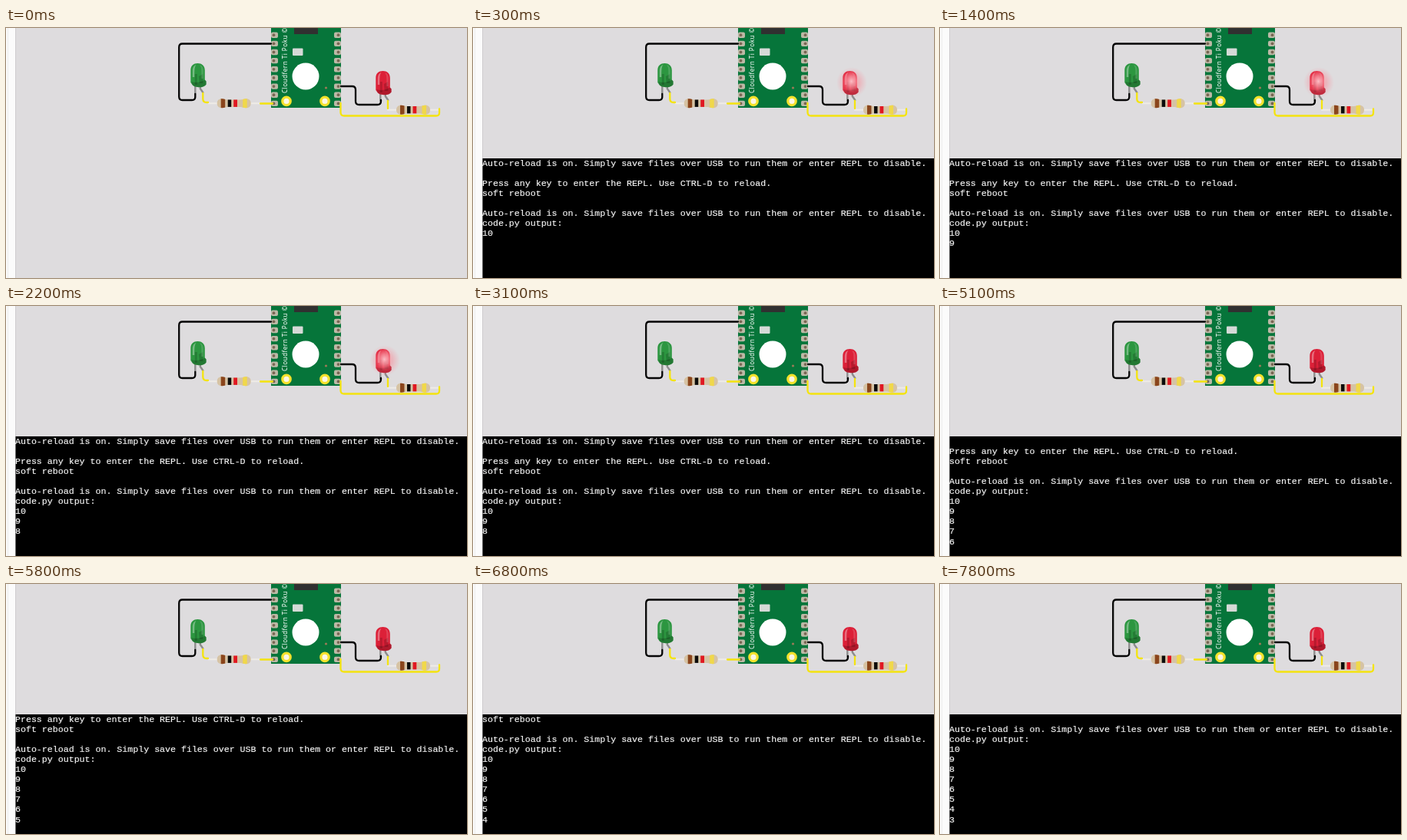
An HTML page that plays this animation: 600 px wide and 326 px high, repeating every 8 s.

```html
<!DOCTYPE html>
<html lang="en">
<head>
<meta charset="utf-8">
<title>Board countdown</title>
<style>
  html, body { margin: 0; width: 100%; height: 100%; overflow: hidden; background: #dedcde; }
  svg { display: block; width: 600px; height: 326px; }
  .wire { fill: none; stroke-width: 2.3; stroke-linecap: round; stroke-linejoin: round; }
  .black { stroke: #050505; }
  .yellow { stroke: #f4e40e; }
  .lead { stroke: #eeebe6; stroke-width: 2; }
  .leg { stroke: #8d8d8d; stroke-width: 2.4; }
  .label { font: 500 8.2px "Noto Sans", "Open Sans", sans-serif; letter-spacing: .44px; fill: #fff; }
  #term text {
    font: 11.61px "Liberation Mono", "Courier New", monospace; white-space: pre;
    fill: #f4f4f4; stroke: #f4f4f4; stroke-width: .2;
  }
</style>
</head>
<body>
<svg viewBox="0 0 600 326" xmlns="http://www.w3.org/2000/svg">
  <defs>
    <radialGradient id="halo">
      <stop offset="0" stop-color="#ff5a6c" stop-opacity=".65"/>
      <stop offset=".5" stop-color="#ff7080" stop-opacity=".36"/>
      <stop offset="1" stop-color="#ff8090" stop-opacity="0"/>
    </radialGradient>
    <radialGradient id="core">
      <stop offset="0" stop-color="#fff" stop-opacity=".65"/>
      <stop offset=".5" stop-color="#ffe0e4" stop-opacity=".36"/>
      <stop offset="1" stop-color="#ffb0b8" stop-opacity="0"/>
    </radialGradient>
    <g id="resistor">
      <path class="wire lead" d="M-11 0H56"/>
      <path fill="#d6c3a4" d="M6-6C10-6 11-4.7 14-4.7H30C33-4.7 34-6 38-6C42-6 44-3.5 44 0S42 6 38 6C34 6 33 4.7 30 4.7H14C11 4.7 10 6 6 6C2 6 0 3.5 0 0S2-6 6-6Z"/>
      <path fill="#8a451c" d="M5-5.9Q8-6.3 10.500-5.2V5.2Q8 6.3 5 5.9Z"/>
      <path fill="#0c0c0c" d="M14-4.700h4.500v9.400h-4.500z"/>
      <path fill="#e01822" d="M21.500-4.700h4.800v9.400h-4.800z"/>
      <path fill="#f0d84a" d="M33.500-5.200Q36-6.300 39-5.900V5.900Q36 6.300 33.500 5.200Z"/>
    </g>
    <g id="shape">
      <path class="wire leg" d="M6 30V39M12.500 30V33L16 38"/>
      <path d="M0 9C0 3 4 0 9.200 0S18.500 3 18.500 9V21.500L20.300 23.500V27.500C18 31 13 31.700 9 31C6 30.700 4 30 2.500 28.500L0 25Z"/>
      <path fill="#000" opacity=".2" d="M1 24Q9 27 18.500 21.500L20.300 23.500V27.500C18 31 13 31.700 9 31Q5 30.500 2.500 28.500Z"/>
      <path fill="#000" opacity=".17" d="M5.500 14H8.500V28H5.500ZM10.500 17L16 14V26H11.500Z"/>
      <path fill="#fff" opacity=".35" d="M2.500 10C2.500 6 4 3 7 2.300C5 5 5 9 5 18H2.500Z"/>
      <path fill="#fff" opacity=".15" d="M12 2Q17 4 16.500 11V20H14V10Q14 5 12 2Z"/>
    </g>
  </defs>

  <rect width="600" height="326" fill="#dedcde"/>
  <rect width="12" height="326" fill="#fbfbfb"/>
  <path d="M2.500 0V326" stroke="#ececec"/>
  <path d="M12.500 0V326" stroke="#cfcdcf"/>

  <g id="board">
    <rect x="345" y="-4" width="91" height="108" fill="#06753a"/>
    <g id="pads"></g>
    <rect x="375" y="-2" width="31" height="10" fill="#303030"/>
    <rect x="373" y="26.500" width="13.500" height="9.500" rx="1" fill="#d5dad7"/>
    <circle cx="390" cy="63" r="17.500" fill="#fff"/>
    <circle cx="416.500" cy="78" r="1.600" fill="#9a7a58"/>
    <g fill="#fbf6e4" stroke="#f4e22c" stroke-width="3.300">
      <circle cx="365" cy="95.400" r="5.200"/>
      <circle cx="415" cy="95.400" r="5.200"/>
    </g>
    <text class="label" transform="translate(366 85) rotate(-90)">Cloudfern Ti Poku ©</text>
  </g>

  <use href="#resistor" x="274.700" y="98.200"/>
  <use href="#resistor" x="508" y="106.700"/>
  <use href="#shape" x="240.300" y="46" fill="#2c9640"/>
  <use href="#shape" x="481.300" y="56" fill="#dc2038"/>

  <path class="wire black" d="M345 20.500H229.500Q225.200 20.500 225.200 25V89.500Q225.200 94 229.500 94H242Q246.300 94 246.300 90V86"/>
  <path class="wire black" d="M436 76H450.500Q455 76 455 80.500V95.500Q455 100 459.500 100H483.500Q488 100 488 95.500V94"/>
  <path class="wire yellow" d="M256.300 85V92.500Q256.300 97 261 97H263M331 98.500H347"/>
  <path class="wire yellow" d="M497 95V105M435.500 98V110Q435.500 114.500 440 114.500H560Q564 114.500 564 110.500V105.500"/>

  <g id="glow">
    <circle cx="493" cy="71" r="20" fill="url(#halo)"/>
    <ellipse cx="492.500" cy="69.500" rx="11" ry="14" fill="url(#core)"/>
  </g>

  <g id="term">
    <rect x="12.500" y="170" width="588" height="157"/>
  </g>
</svg>
<script>
const NS = "http://www.w3.org/2000/svg";
const LOOP = 8000, ROWS = 11, ROW_H = 13.1;
const OPEN = 100, FIRST = 200, STEP = 1000, LIT = 600;
const reload = "Auto-reload is on. Simply save files over USB to run them or enter REPL to disable.";
const intro = [
  reload, "",
  "Press any key to enter the REPL. Use CTRL-D to reload.",
  "soft reboot", "",
  reload, "code.py output:"
];
const byId = id => document.getElementById(id);

function add(parent, tag, attrs) {
  const el = document.createElementNS(NS, tag);
  for (const key in attrs) el.setAttribute(key, attrs[key]);
  return parent.appendChild(el);
}

for (let i = 0; i < 9; i++) {
  const y = 9.2 + i * 11.15;
  for (const [x, hole] of [[345, 348.5], [427, 432.5]]) {
    add(byId("pads"), "rect", { x, y: y - 3.7, width: 9, height: 7.4, rx: 2, fill: "#bcb9a6" });
    add(byId("pads"), "circle", { cx: hole, cy: y, r: 1.9, fill: "#786653" });
  }
}

const term = byId("term"), glow = byId("glow");
const rows = Array.from({ length: ROWS }, (_, i) =>
  add(term, "text", { x: 12, y: 179.5 + i * ROW_H }));

function render(t) {
  const since = t - FIRST;
  const count = since < 0 ? 0 : Math.floor(since / STEP) + 1;
  const lines = intro.concat(Array.from({ length: count }, (_, i) => String(10 - i)));
  const shown = lines.slice(-ROWS);
  rows.forEach((row, i) => {
    const line = shown[i] || "";
    if (row.textContent !== line) row.textContent = line;
  });
  term.style.display = t < OPEN ? "none" : "";
  glow.style.display = since >= 0 && since % STEP < LIT ? "" : "none";
}

const start = performance.now();
function tick() {
  render((performance.now() - start) % LOOP);
  requestAnimationFrame(tick);
}
tick();
</script>
</body>
</html>
```
